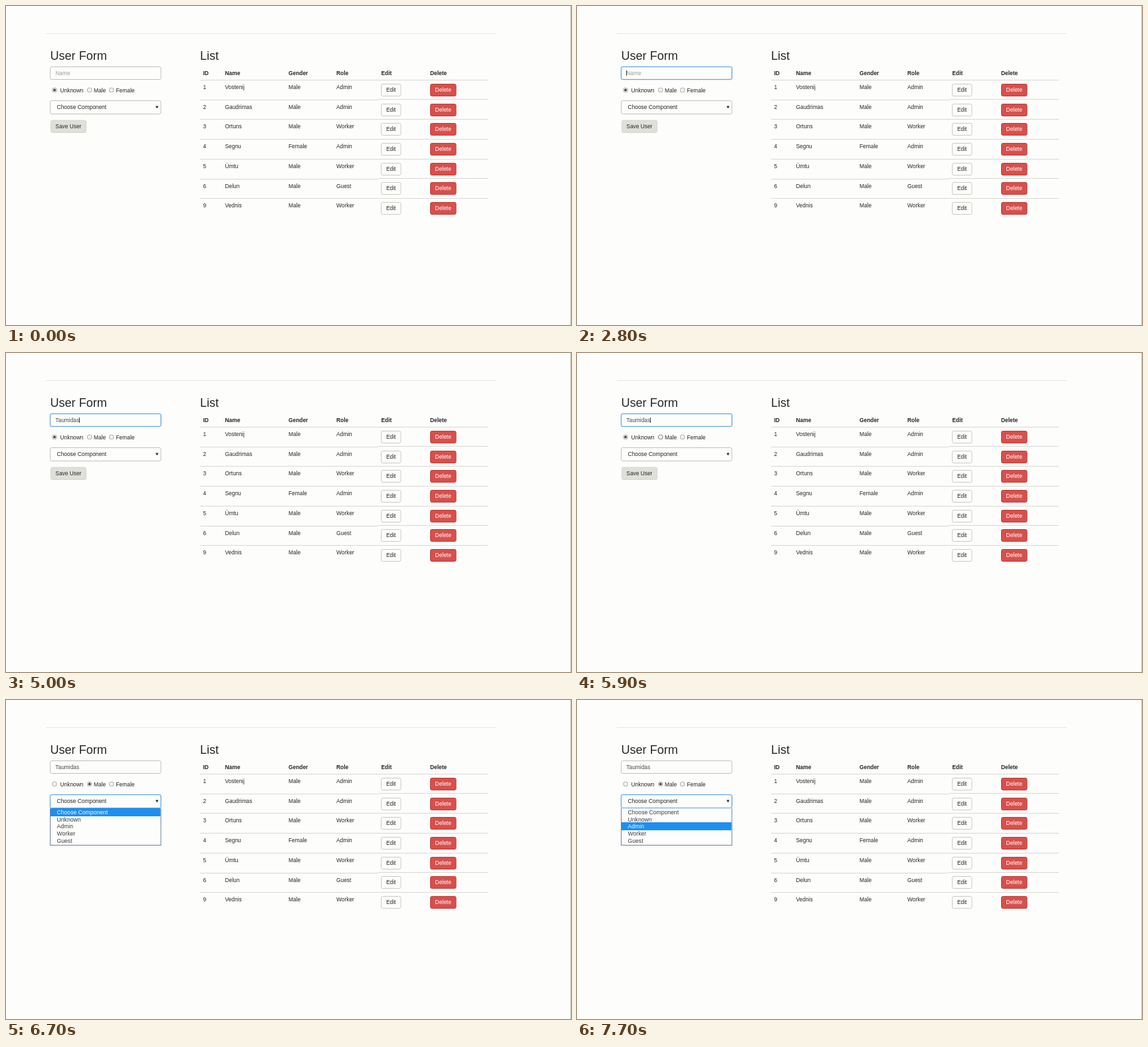
An HTML page with a canvas for the animation above (8 s loop, 850 by 480 pixels).

```html
<!DOCTYPE html>
<html lang="en">
<head>
<meta charset="utf-8">
<title>User form</title>
<style>
  html, body { margin: 0; width: 100%; height: 100%; overflow: hidden; background: #fdfdfc; }
  canvas { display: block; }
</style>
</head>
<body>
<canvas id="stage" width="850" height="480"></canvas>
<script>
const ctx = document.getElementById('stage').getContext('2d');
const LOOP = 8000;
const INK = '#262626', PAPER = '#fdfdfc', EDGE = '#c2c2ba', RULE = '#d8d8d2', BLUE = '#62a5de';

const COLS = [['ID', 296.5], ['Name', 329.5], ['Gender', 425], ['Role', 497], ['Edit', 564.5], ['Delete', 638]];
const USERS = [
  ['1', 'Vostenij', 'Male', 'Admin'],
  ['2', 'Gaudrimas', 'Male', 'Admin'],
  ['3', 'Ortuns', 'Male', 'Worker'],
  ['4', 'Segnu', 'Female', 'Admin'],
  ['5', 'Ümtu', 'Male', 'Worker'],
  ['6', 'Delun', 'Male', 'Guest'],
  ['9', 'Vednis', 'Male', 'Worker']
];
const RADIOS = [['Unknown', 73, 81.5], ['Male', 125.7, 132], ['Female', 158.7, 165.5]];
const OPTIONS = ['Choose Component', 'Unknown', 'Admin', 'Worker', 'Guest'];
const TYPED = 'Taumidas';

// step lists: [time, value]
const LETTERS = [[0, 0], [3200, 1], [3300, 2], [3400, 3], [3600, 4], [3830, 5], [4400, 6], [4530, 7], [4670, 8]];
const CARET = [[0, 0], [900, 1], [1400, 0], [1800, 1], [2400, 0], [2800, 1], [5270, 0], [5830, 1], [6070, 0]];
const HOVERED = [[0, 0], [7000, 1], [7600, 2], [7640, 3], [7700, 2]];

const at = (steps, t) => steps.reduce((v, s) => t >= s[0] ? s[1] : v, 0);
const ramp = (t, from, len) => {
  const p = Math.min(1, Math.max(0, (t - from) / len));
  return p * p * (3 - 2 * p);
};

function text(str, x, y, size = 8.4, color = INK, weight = '') {
  ctx.font = `${weight} ${size}px "Liberation Sans", Arial, sans-serif`;
  ctx.fillStyle = color;
  ctx.fillText(str, x, y);
}

function rect(x, y, w, h, color) {
  ctx.fillStyle = color;
  ctx.fillRect(x, y, w, h);
}

function box(x, y, w, h, fill, stroke) {
  ctx.beginPath();
  ctx.roundRect(x, y, w, h, 2.2);
  ctx.fillStyle = fill;
  ctx.fill();
  ctx.strokeStyle = stroke;
  ctx.lineWidth = 1;
  ctx.stroke();
}

function field(y, h, focus) {
  box(66.5, y, 166.5, h, PAPER, EDGE);
  if (!focus) return;
  ctx.save();
  ctx.globalAlpha = focus;
  ctx.shadowColor = 'rgba(102,175,233,.4)';
  ctx.shadowBlur = 2;
  box(66.5, y, 166.5, h, PAPER, BLUE);
  ctx.restore();
}

function disc(x, y, r, color) {
  ctx.beginPath();
  ctx.arc(x, y, r, 0, 7);
  ctx.fillStyle = color;
  ctx.fill();
}

function radio([label, x, tx], on, hover) {
  disc(x, 126.4, 3.7, hover ? '#7c7c78' : '#a8a8a4');
  disc(x, 126.4, 2.8, '#f1f1ee');
  if (on) disc(x, 126.4, 1.9, '#454545');
  text(label, tx, 129.6);
}

function table() {
  text('List', 292, 81, 18);
  COLS.forEach(([label, x]) => text(label, x, 103.6, 8.4, INK, 'bold'));
  USERS.forEach((user, i) => {
    const dy = i * 29.7;
    rect(292, Math.floor(111.4 + 29.73 * i), 268, 1, RULE);
    rect(560, Math.floor(111.2 + 29.73 * i), 165, 1, RULE);
    user.forEach((cell, c) => text(cell, COLS[c][1], Math.round(125 + dy)));
    const y = Math.round(117 + dy - 0.2) + 0.5;
    box(564.5, y, 29.5, 18, PAPER, '#cacac4');
    text('Edit', 572, y + 11.6);
    box(638.5, y, 38.5, 18, '#d6504c', '#c23c38');
    text('Delete', 645.6, y + 11.6, 8.4, '#fff');
  });
}

function nameField(t) {
  field(91.5, 19, ramp(t, 870, 200) - ramp(t, 6070, 160));
  const word = TYPED.slice(0, at(LETTERS, t));
  if (word) text(word, 74.3, 103.8, 8.4, '#484848');
  else text('Name', 74.3, 103.8, 8.4, '#9c9c96');
  if (at(CARET, t)) {
    const w = word ? ctx.measureText(word).width : 0;
    rect(Math.round(74.2 + w), 97, 1, 8, '#444');
  }
}

function dropdown(t) {
  const top = 163, step = 10.9;
  const hot = at(HOVERED, t);
  rect(66, top, 167.5, 56, '#6f8398');
  rect(67, top, 165.5, 55, PAPER);
  OPTIONS.forEach((label, i) => {
    const y = top + i * step;
    if (i === hot) rect(67, Math.floor(y), 165.5, 12, '#1e8ff0');
    text(label, 76.6, Math.round(y + 8.6), 8.6, i === hot ? '#f4faff' : '#3c3c3c');
  });
}

function select(t) {
  field(142.5, 20, ramp(t, 6530, 150));
  text('Choose Component', 76.6, 155.2);
  ctx.beginPath();
  ctx.moveTo(225, 150.5);
  ctx.lineTo(229.4, 150.5);
  ctx.lineTo(227.2, 154.3);
  ctx.fillStyle = '#222';
  ctx.fill();
}

function draw(t) {
  rect(0, 0, 850, 480, PAPER);
  rect(60, 41, 677, 1, '#e6e6e8');
  rect(849, 0, 1, 480, '#c4c4bc');
  table();
  text('User Form', 66.4, 81, 18.1);
  nameField(t);
  const picked = t < 6070 ? 0 : 1;
  RADIOS.forEach((r, i) => radio(r, i === picked, i === 1 && t >= 5870 && t < 6230));
  select(t);
  box(67.5, 172, 53, 18.5, '#e0e0da', '#d6d6ce');
  text('Save User', 74.3, 183.6);
  if (t >= 6600) dropdown(t);
}

function frame() {
  draw(performance.now() % LOOP);
  requestAnimationFrame(frame);
}
frame();
</script>
</body>
</html>
```
